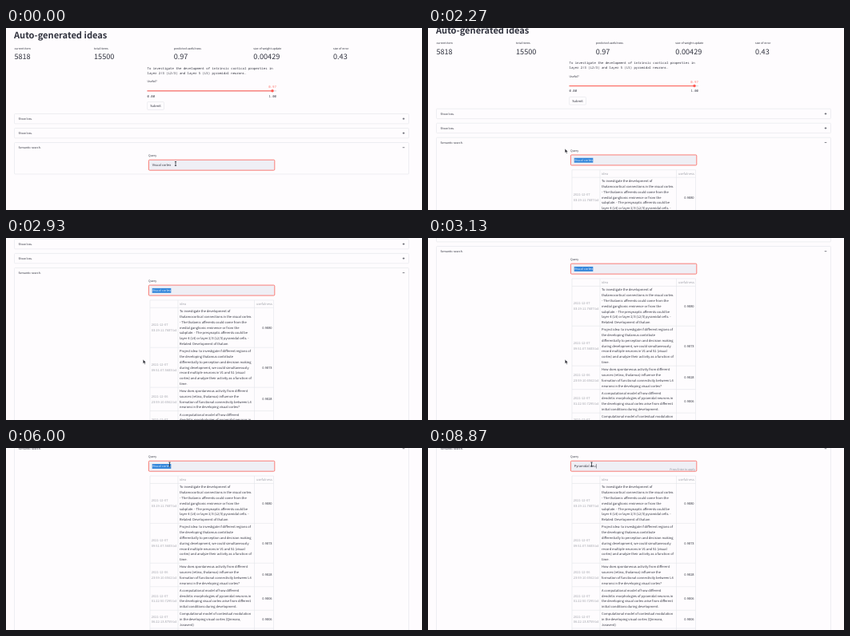
Recreate the animation shown at these times as an HTML page. Size 520 by 228 pixels, loop 8990 ms.

```html
<!DOCTYPE html>
<html lang="en">
<head>
<meta charset="utf-8">
<title>Auto-generated ideas</title>
<style>
  html, body { margin: 0; width: 100%; height: 100%; overflow: hidden; background: #fefcfe; }
  svg { display: block; width: 520px; height: 228px; }
  text {
    font-family: "Noto Sans CJK JP", "Noto Sans CJK SC", "Open Sans", sans-serif;
    font-size: 4.03px; fill: #31333f; white-space: pre;
    text-rendering: geometricPrecision;
  }
  .title { font-size: 11.1px; font-weight: 700; }
  .value { font-size: 9.13px; }
  .label { font-size: 3.56px; }
  .mono { font-family: "Noto Sans Mono", "DejaVu Sans Mono", monospace; font-size: 3.98px; }
  .coral { fill: #ff6e66; }
  .mute { fill: #a0a2aa; }
  .hint { font-size: 3.45px; fill: #8f919a; }
  .end { text-anchor: end; }
  .mid { text-anchor: middle; }
  .box { fill: none; stroke: #e3e4ea; stroke-width: .6; }
  .sign { fill: none; stroke: #31333f; stroke-width: .6; }
  .picked { fill: #e9f2fc; }
</style>
</head>
<body>
<svg viewBox="0 0 520 228">
  <g id="page">
    <text class="title" x="10" y="13.3">Auto-generated ideas</text>
    <g id="metrics"></g>
    <text class="mono" x="176.5" y="51.7">To investigate the development of intrinsic cortical properties in</text>
    <text class="mono" x="176.5" y="57.7">layer 2/3 (L2/3) and layer 5 (L5) pyramidal neurons.</text>

    <text class="label" x="176.5" y="68.4">Useful?</text>
    <text class="mono coral mid" x="333" y="75">0.97</text>
    <rect x="176.5" y="78.2" width="161.5" height="1.2" fill="#dcdde3"/>
    <rect x="176.5" y="78.2" width="156.5" height="1.2" fill="#ff6e66"/>
    <circle cx="333" cy="78.8" r="1.75" fill="#ff5a52"/>
    <text class="mono" x="176.5" y="86.5">0.00</text>
    <text class="mono end" x="338" y="86.5">1.00</text>

    <rect class="box" x="176.6" y="92.6" width="20.9" height="9.8" rx="1.1"/>
    <text class="mid" x="187" y="98.9">Submit</text>

    <rect class="box" x="10.5" y="107.5" width="493" height="12.4" rx="1"/>
    <text class="label" x="15.5" y="115">Show loss.</text>
    <path class="sign" d="M495.7 113.7h2.6m-1.3-1.3v2.6"/>
    <rect class="box" x="10.5" y="125.5" width="493" height="12.4" rx="1"/>
    <text class="label" x="15.5" y="133">Show loss.</text>
    <path class="sign" d="M495.7 131.7h2.6m-1.3-1.3v2.6"/>
    <rect class="box" id="panel" x="10.5" y="143.5" width="493" height="39.5" rx="1"/>
    <text class="label" x="15.5" y="151">Semantic search.</text>
    <path class="sign" d="M495.7 149.7h2.6"/>

    <text class="label" x="178" y="160.9">Query</text>
    <rect x="178.4" y="165.2" width="157.4" height="13" rx="1.1" fill="#efeff5" stroke="#f9675f" stroke-width=".85"/>
    <rect id="mark" y="169" height="5.9" fill="#2f84da"/>
    <text id="query" x="182.7" y="173.3"><tspan></tspan><tspan class="picked"></tspan><tspan></tspan></text>
    <rect id="caret" y="169" width=".45" height="5.6" fill="#31333f"/>
    <text id="hint" class="hint end" x="334" y="176.6">Press Enter to apply</text>

    <g id="table"></g>
    <path id="expand" class="sign" d="M342.2 187V185h2M342.2 185l4 4M346.2 187v2h-2"/>
  </g>
  <path id="arrow" d="M0 0v5l1.2-1 .9 1.9 .9-.4-.9-1.8h1.6z" fill="#22232b" stroke="#fff" stroke-width=".35"/>
  <path id="beam" d="M-1.1-2.5h2.2M0-2.5v5M-1.1 2.5h2.2" fill="none" stroke="#22232b" stroke-width=".75"/>
</svg>
<script>
const LOOP = 8990, FRAME = 1000 / 15;
const $ = id => document.getElementById(id);

function add(parent, tag, attrs, content = '') {
  const el = document.createElementNS('http://www.w3.org/2000/svg', tag);
  for (const name in attrs) el.setAttribute(name, attrs[name]);
  el.textContent = content;
  return parent.appendChild(el);
}
const label = (parent, x, y, content, cls = '') =>
  add(parent, 'text', { x, y, class: cls }, content);

[['current item', '5818'], ['total items', '15500'], ['predicted usefulness', '0.97'],
 ['size of weight update', '0.00429'], ['size of error', '0.43']].forEach(([name, value], i) => {
  const x = 10.4 + i * 99.65;
  label($('metrics'), x, 26.5, name, 'label');
  label($('metrics'), x, 38.9, value, 'value');
});

const rows = [
  ['2021-12-07', '03:19:11.7687.txt', '0.9880', `To investigate the development of
thalamocortical connections in the visual cortex.
- The thalamic afferents could come from the
medial ganglionic eminence or from the
subplate. - The presynaptic afferents could be
layer 4 (L4) or layer 2/3 (L2/3) pyramidal cells. -
Related: Development of thalam`],
  ['2021-12-07', '09:51:07.5683.txt', '0.9873', `Project idea: to investigate if different regions of
the developing thalamus contribute
differentially to perception and decision making
during development, we could simultaneously
record multiple neurons in V1 and S1 (visual
cortex) and analyze their activity as a function of
time.`],
  ['2021-12-06', '23:59:10.6562.txt', '0.9828', `How does spontaneous activity from different
sources (retina, thalamus) influence the
formation of functional connectivity between L4
neurons in the developing visual cortex?`],
  ['2021-12-07', '01:22:50.7295.txt', '0.9806', `A computational model of how different
dendritic morphologies of pyramidal neurons in
the developing visual cortex arise from different
initial conditions during development.`],
  ['2021-12-07', '06:22:13.8759.txt', '0.9806', `Computational model of contextual modulation
in the developing visual cortex (Qinmara,
Joravent)`]
];

const LINE = 6.8, PAD = 1.15, BASE = 1.4;

function buildTable(table) {
  const rule = y => add(table, 'path', { class: 'box', d: `M180 ${y}H334.5` });
  add(table, 'path', { class: 'box', d: 'M180 184V390M215 184V390M310.5 184V390M334.5 184V390' });
  rule(184);
  label(table, 217, 190.4, 'idea', 'mute');
  label(table, 332.8, 190.4, 'usefulness', 'mute end');
  let rowY = 193.45;
  for (const [date, file, score, idea] of rows) {
    const lines = idea.split('\n'), height = lines.length * LINE + 2 * PAD;
    const middle = rowY + height / 2 + BASE;
    rule(rowY);
    lines.forEach((s, i) => label(table, 217, rowY + PAD + (i + .5) * LINE + BASE, s));
    label(table, 181.8, middle - LINE / 2, date, 'mute');
    label(table, 181.8, middle + LINE / 2, file, 'mute');
    label(table, 332.6, middle, score, 'end');
    rowY += height;
  }
  rule(rowY);
}
buildTable($('table'));

// [ms, scroll offset]
const scrollKeys = [[2200, 0], [2266, 6], [2333, 20], [2400, 42], [2466, 62], [2533, 74.5],
  [2733, 74.5], [2800, 82], [2933, 106], [3066, 126], [3200, 140], [3333, 147.5], [3400, 149]];
// [ms, x, y]
const pointerKeys = [[333, 212, 170], [533, 196, 168], [600, 196, 168], [1000, 197, 156],
  [1866, 197, 156], [2133, 171.2, 151.3], [2266, 171.2, 151.3], [2533, 170.3, 150.8],
  [2733, 170.3, 150.8], [2933, 171.3, 152.3], [3333, 171.3, 152.3], [3666, 212.5, 42],
  [3733, 198.5, 36.5], [3800, 198.5, 36.5], [4133, 204.5, 20.5]];
// [ms, text, selection start, selection end]
const old = 'Visual cortex', fresh = 'Pyramidal neu';
const edits = [[0, old, 0, 0], [66, old, 7, 13], [133, old, 0, 13], [4400, old, 0, 0],
  [4533, old, 7, 13], [4666, old, 0, 13], [5933, old, 0, 0], [6000, old, 0, 13]];
const TYPING = 6866;
[TYPING, 7066, 7133, 7333, 7866, 7933, 8133, 8200, 8333, 8533, 8666, 8800, 8866]
  .forEach((ms, i) => edits.push([ms, fresh.slice(0, i + 1), 0, 0]));

function sample(keys, t) {
  const i = keys.findIndex(k => k[0] > t);
  if (i < 0) return keys[keys.length - 1].slice(1);
  if (i === 0) return keys[0].slice(1);
  const a = keys[i - 1], b = keys[i], p = (t - a[0]) / (b[0] - a[0]);
  return a.slice(1).map((v, j) => v + (b[j + 1] - v) * p);
}
const show = (id, on) => $(id).setAttribute('visibility', on ? 'visible' : 'hidden');

function drawQuery(t) {
  const [, content, from, to] = edits.filter(e => e[0] <= t).pop();
  const query = $('query'), spans = query.children;
  const parts = [content.slice(0, from), content.slice(from, to), content.slice(to)];
  parts.forEach((s, i) => { if (spans[i].textContent !== s) spans[i].textContent = s; });
  const left = 182.7 + (from ? query.getSubStringLength(0, from) : 0);
  $('mark').setAttribute('x', left);
  $('mark').setAttribute('width', to > from ? query.getSubStringLength(from, to - from) : 0);
  $('caret').setAttribute('x', 182.9 + query.getComputedTextLength());
  show('caret', t >= TYPING);
  show('hint', t >= TYPING);
}

function draw(ms) {
  const t = Math.floor((ms % LOOP + 4) / FRAME) * FRAME + .5;
  const [offset] = sample(scrollKeys, t);
  const [x, y] = sample(pointerKeys, t);
  const pageY = y + offset;
  const ready = t >= 666;
  const typing = x > 178 && pageY > 165 && pageY < 179;

  $('page').setAttribute('transform', `translate(0 ${-offset})`);
  $('panel').setAttribute('height', ready ? 300 : 39.5);
  $('table').setAttribute('opacity', Math.min(1, Math.max(0, (t - 600) / 200)));
  show('expand', ready && x > 180 && pageY > 184);
  for (const id of ['arrow', 'beam']) {
    show(id, (id === 'beam') === typing);
    $(id).setAttribute('transform', `translate(${x} ${y})`);
  }
  drawQuery(t);
}

const startTime = performance.now();
function tick() {
  draw(performance.now() - startTime);
  requestAnimationFrame(tick);
}
tick();
</script>
</body>
</html>
```
